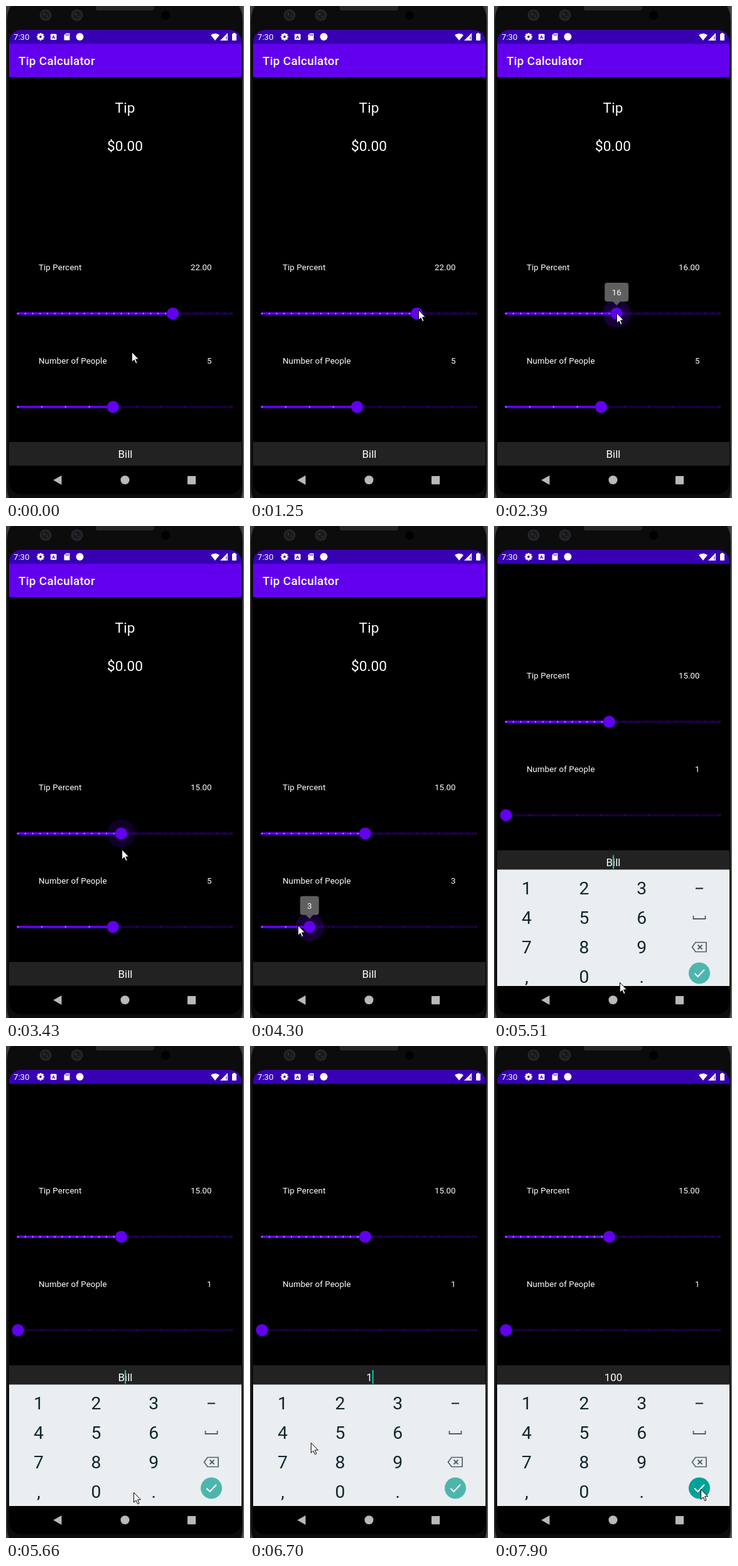
An HTML page with a canvas that plays this animation: 379 px wide and 784 px high, repeating every 8000 ms.

```html
<!DOCTYPE html>
<html lang="en">
<head>
<meta charset="utf-8">
<title>Tip Calculator</title>
<style>
  html, body { margin: 0; width: 100%; height: 100%; overflow: hidden; background: #0c0c0c; }
  canvas { display: block; width: 379px; height: 784px; }
</style>
</head>
<body>
<canvas id="stage"></canvas>
<script>
const W = 379, H = 784, LOOP = 8000;
const canvas = document.getElementById('stage');
const ctx = canvas.getContext('2d');
const dpr = window.devicePixelRatio || 1;
canvas.width = W * dpr;
canvas.height = H * dpr;

const PURPLE = '#6200ee', STATUS = '#3700b3', WHITE = '#fff';
const FAINT = 'rgba(98,0,238,0.24)';
const TRACK_X = 19.1, TRACK_W = 340.5;
const STEP = 125; // ms between pointer positions

// Pointer moves: it reaches x, y at `at`, after a number of equal hops
const rest = { x: 200, y: 551 };
const moves = [
  { at: 770, hops: 3, x: 175, y: 525 },
  { at: 1250, hops: 4, x: 268, y: 484 },
  { at: 2390, hops: 5, x: 195, y: 489 },
  { at: 3050, hops: 3, x: 187, y: 489 },
  { at: 4030, hops: 6, x: 170, y: 646 },
  { at: 4300, hops: 2, x: 76, y: 636 },
  { at: 4570, hops: 2, x: 18, y: 636 },
  { at: 4850, hops: 1, x: 83, y: 671 },
  { at: 5360, hops: 4, x: 200, y: 727 },
  { at: 5660, hops: 2, x: 203, y: 711 },
  { at: 5800, hops: 1, x: 203, y: 664 },
  { at: 6200, hops: 3, x: 64, y: 582 },
  { at: 7060, hops: 5, x: 146, y: 707 },
  { at: 7750, hops: 5, x: 329, y: 706 }
];

const clamp = (v, lo, hi) => Math.min(hi, Math.max(lo, v));
const mix = (a, b, k) => a + (b - a) * k;
const within = (t, a, b) => t >= a && t < b;

function pointerAt(t) {
  let { x, y } = rest;
  for (const m of moves) {
    const done = clamp(m.hops + Math.floor((t - m.at) / STEP), 0, m.hops);
    x = mix(x, m.x, done / m.hops);
    y = mix(y, m.y, done / m.hops);
    if (done < m.hops) break;
  }
  return { x, y };
}

function rect(x, y, w, h, color) {
  ctx.fillStyle = color;
  ctx.fillRect(x, y, w, h);
}

function round(x, y, w, h, r, color) {
  ctx.fillStyle = color;
  ctx.beginPath();
  ctx.roundRect(x, y, w, h, r);
  ctx.fill();
}

function disc(x, y, r, color) {
  ctx.fillStyle = color;
  ctx.beginPath();
  ctx.arc(x, y, r, 0, Math.PI * 2);
  ctx.fill();
}

function poly(points, fill, stroke, width = 1, close = true) {
  ctx.beginPath();
  points.forEach(([x, y]) => ctx.lineTo(x, y));
  if (close) ctx.closePath();
  if (fill) { ctx.fillStyle = fill; ctx.fill(); }
  if (stroke) { ctx.strokeStyle = stroke; ctx.lineWidth = width; ctx.stroke(); }
}

function text(str, x, y, size, { align = 'left', color = WHITE, weight = 400, gap = 0 } = {}) {
  ctx.font = `${weight} ${size}px Roboto, sans-serif`;
  ctx.letterSpacing = gap + 'px';
  ctx.textAlign = align;
  ctx.fillStyle = color;
  ctx.fillText(str, x, y);
}

function clipTo(x, y, w, h, r = 0) {
  ctx.beginPath();
  ctx.roundRect(x, y, w, h, r);
  ctx.clip();
}

function drawPhone() {
  rect(0, 0, W, H, '#3c3c3c');
  rect(377, 0, 2, H, '#5c5c5c');
  round(1.5, -20, 375.5, 830, 42, '#0c0c0c');
  for (const x of [63, 113]) {
    disc(x, 14.5, 9.5, '#242528');
    disc(x, 14.5, 6, '#17181b');
    disc(x - 2, 13, 1.5, '#3c3d42');
    disc(x + 2.5, 16.5, 1.2, '#34353a');
  }
  round(143, -6, 93, 13, 4, '#2b2b2b');
  for (let x = 146; x < 234; x += 3) rect(x, 1, 1, 5, '#1d1d1d');
  disc(254, 15, 7, '#000');
}

function drawGear(x, y) {
  ctx.save();
  ctx.translate(x, y);
  for (let i = 0; i < 8; i++) {
    ctx.rotate(Math.PI / 4);
    rect(-1.4, -6, 2.8, 4, WHITE);
  }
  ctx.restore();
  disc(x, y, 4.6, WHITE);
  disc(x, y, 1.9, STATUS);
}

function drawStatusBar() {
  rect(5, 38, 370, 22.3, STATUS);
  text('7:30', 12, 54, 13.2);
  drawGear(55, 49);
  round(71, 44.5, 9.5, 9.5, 1, WHITE);
  text('A', 75.7, 52, 8, { align: 'center', color: STATUS, weight: 700 });
  poly([[95.5, 43.5], [101.5, 43.5], [101.5, 54.5], [92.5, 54.5], [92.5, 46.5]], WHITE);
  for (let x = 95; x < 101; x += 2) rect(x, 45, 1, 2.5, STATUS);
  disc(117.5, 49, 6, WHITE);

  ctx.beginPath();
  ctx.moveTo(333, 55);
  ctx.lineTo(326, 46.3);
  ctx.quadraticCurveTo(333, 41, 340, 46.3);
  ctx.fill();
  poly([[353, 43], [353, 55], [341, 55]], WHITE);
  rect(350.4, 48.5, 1, 5, STATUS);
  round(360, 44, 7, 11, 1, WHITE);
  rect(362, 42.8, 3, 2, WHITE);
}

function drawSlider(y, max, value, press) {
  const at = v => TRACK_X + TRACK_W * (v - 1) / (max - 1);
  const x = at(value);
  round(TRACK_X - 1.9, y - 1.9, TRACK_W + 3.8, 3.8, 1.9, FAINT);
  round(TRACK_X - 1.9, y - 1.9, x - TRACK_X + 1.9, 3.8, 1.9, PURPLE);
  for (let v = 1; v <= max; v++) {
    disc(at(v), y, 1, v <= value ? 'rgba(255,255,255,0.72)' : 'rgba(98,0,238,0.54)');
  }
  ctx.globalAlpha = press.halo;
  disc(x, y, press.radius, FAINT);
  ctx.globalAlpha = 1;
  disc(x, y, 9.6, PURPLE);
  if (press.label) {
    const half = value > 9 ? 19 : 15;
    const cx = Math.max(x, 5 + half);
    round(cx - half, y - 49, half * 2, 30, 4, '#5f5f5f');
    poly([[x - 6, y - 19.2], [x + 6, y - 19.2], [x, y - 13]], '#5f5f5f');
    text(String(value), cx, y - 29, 13.2, { align: 'center' });
  }
}

function pressState(t, on, off, grow) {
  return {
    label: within(t, on, off),
    halo: t < on ? 0 : t < off ? 1 : clamp(0.7 - (t - off) / 350, 0, 1),
    radius: mix(10, 22.5, clamp((t - on) / grow, 0, 1))
  };
}

// While held, the slider follows the pointer and snaps to its steps.
function dragValue(t, from, to, max) {
  const x = pointerAt(clamp(t, from, to)).x + 1;
  return clamp(Math.round(1 + (x - TRACK_X) / TRACK_W * (max - 1)), 1, max);
}

function drawField(t) {
  rect(5, 694.7, 370, 37.8, '#222');
  const typed = t < 6460 ? '' : t < 7060 ? '1' : t < 7210 ? '10' : '100';
  text(typed || 'Bill', 190, 720, 17, { align: 'center' });
  if (within(t, 5360, 5800) || within(t, 6460, 7750)) {
    const x = typed ? 190 + ctx.measureText(typed).width / 2 : 189.2;
    rect(x, 702.5, 1.8, 22, '#03dac5');
  }
}

function drawRow(y, label, value) {
  text(label, 52, y, 13.3, { gap: 0.1 });
  text(value, 327.5, y, 13.3, { align: 'right' });
}

function drawApp(t, shift) {
  const percent = dragValue(t, 1250, 3050, 30);
  const people = dragValue(t, 4030, 4570, 10);
  ctx.save();
  clipTo(5, 60, 370, 673);
  ctx.translate(0, -shift);
  rect(5, 60, 370, 53.4, PURPLE);
  text('Tip Calculator', 20, 94, 18.9, { weight: 500, gap: 0.28 });
  text('Tip', 189.5, 170, 22.7, { align: 'center' });
  text('$0.00', 189.5, 231, 22.7, { align: 'center' });
  drawRow(421, 'Tip Percent', percent.toFixed(2));
  drawSlider(490, 30, percent, pressState(t, 1390, 3430, 510));
  drawRow(570, 'Number of People', String(people));
  drawSlider(638.8, 10, people, pressState(t, 4180, 4850, 100));
  drawField(t);
  ctx.restore();
}

function drawKeyboard(t, drop) {
  const ink = '#10262e', soft = '#4f5f67';
  ctx.save();
  clipTo(5, 60, 370, 673);
  ctx.translate(0, drop);
  rect(5, 539.5, 370, 194, '#eaeef1');
  if (within(t, 6340, 6580)) round(16, 549, 72, 40, 6, '#dde2e5');
  ['123', '456', '789', ',0.'].forEach((row, r) => {
    [...row].forEach((key, c) => {
      text(key, 52 + c * 91.6, 579 + r * 47, 28.4, { align: 'center', color: ink });
    });
  });
  rect(321, 568.5, 12, 2, ink);
  poly([[317.5, 613], [317.5, 618], [336.5, 618], [336.5, 613]], null, soft, 1.8, false);
  poly([[315.5, 663], [321, 655.5], [338, 655.5], [338, 670.5], [321, 670.5]], null, soft, 1.7);
  for (const d of [-3.5, 3.5]) poly([[328 - d, 659.5], [328 + d, 666.5]], null, soft, 1.8);
  disc(327, 704.5, 17, t >= 7900 ? '#00a197' : '#4db6ac');
  poly([[319.5, 705], [324.5, 710], [335, 699]], null, WHITE, 2.1, false);
  ctx.restore();
}

function drawNav() {
  const gray = '#b9b9b9';
  poly([[75.3, 755.5], [88.5, 748], [88.5, 763]], gray);
  disc(189.5, 755.3, 7, gray);
  round(289, 749, 13.2, 13.2, 1, gray);
}

function drawPointer({ x, y }) {
  ctx.save();
  ctx.translate(x + 0.5, y + 0.5);
  poly([[0, 0], [0, 15.8], [3.6, 12.4], [6.2, 18.2], [8.6, 17.2], [6.1, 11.4], [11, 11.4]], WHITE, '#000');
  ctx.restore();
}

function draw(t) {
  ctx.setTransform(dpr, 0, 0, dpr, 0, 0);
  drawPhone();
  ctx.save();
  clipTo(5, 38, 370, 740, 19);
  rect(5, 38, 370, 740, '#000');
  const shift = t < 5510 ? 0 : t < 5660 ? 178 : 186;
  drawApp(t, shift);
  if (shift) drawKeyboard(t, 186 - shift);
  drawStatusBar();
  drawNav();
  ctx.restore();
  drawPointer(pointerAt(t));
}

const start = performance.now();
function tick() {
  draw((performance.now() - start) % LOOP);
  requestAnimationFrame(tick);
}
tick();
</script>
</body>
</html>
```
